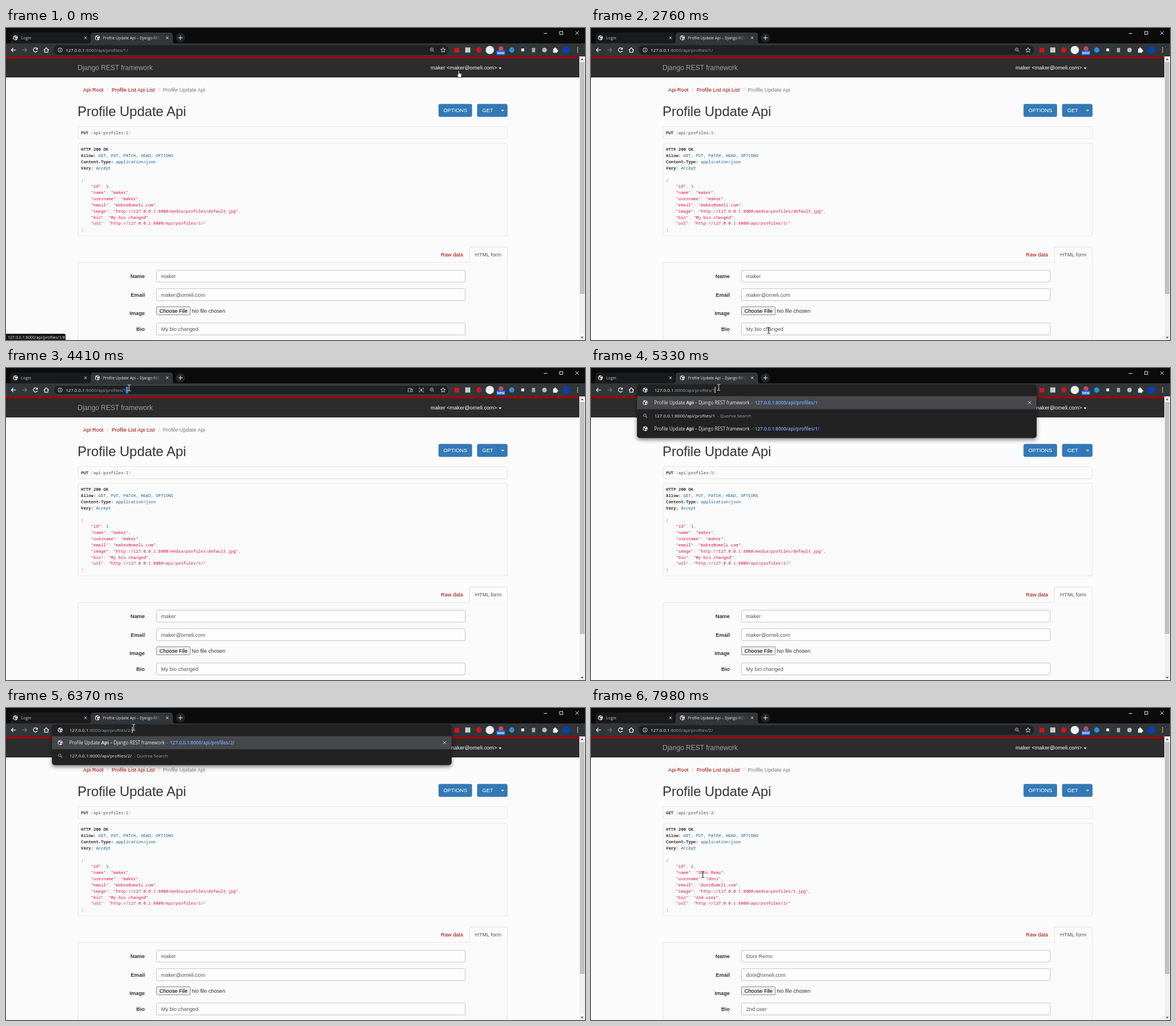
These frames come from a looping animation (1020 by 549 pixels, 8000 ms). An HTML page:

```html
<!DOCTYPE html>
<html lang="en">
<head>
<meta charset="utf-8">
<title>Profile Update Api</title>
<style>
html,body{margin:0;width:100%;height:100%;overflow:hidden;background:#fbfbfb}
svg{display:block;width:1020px;height:549px}
text{white-space:pre;font-family:"Liberation Sans",Arial,sans-serif}
.mono{font-family:"Noto Sans Mono",monospace}
.ui{font-family:"Open Sans","Noto Sans",sans-serif}
</style>
</head>
<body>
<svg id="stage" viewBox="0 0 1020 549" xmlns="http://www.w3.org/2000/svg">
  <defs>
    <linearGradient id="fade"><stop offset="0" stop-color="#323639" stop-opacity="0"/><stop offset="1" stop-color="#323639"/></linearGradient>
    <filter id="shadow" x="-5%" y="-15%" width="110%" height="140%"><feDropShadow dx="0" dy="3" stdDeviation="3.5" flood-color="#000" flood-opacity=".5"/></filter>
    <clipPath id="tabClip"><rect x="170" y="9" width="104" height="17"/></clipPath>
    <g id="globe"><circle r="4.3" fill="#e8eaed"/><path d="M-3.4-1.6L-.9-.8.2.6-.4 3.6-2 3ZM.2-3.6L2.3-3 1.2-1-.2-1.6ZM2 .6L3.7.2 2.8 2.2 1.4 2Z" fill="#202124"/></g>
  </defs>
  <g id="page"></g><g id="chrome"></g><g id="address"></g><g id="status"></g><g id="cursor"></g>
</svg>
<script>
const LOOP = 8000, HOST = '127.0.0.1', PATH = ':8000/api/profiles/';
const RED = '#a30000', STR = '#dd1144', LIT = '#195f91', PUN = '#93a1a1', GREY = '#9aa0a6', INK = '#e8eaed';
const $ = id => document.getElementById(id);
const esc = s => String(s).replace(/&/g, '&amp;').replace(/</g, '&lt;').replace(/>/g, '&gt;');
const text = (x, y, s, size, fill, attr = '') =>
  `<text x="${x}" y="${y}" font-size="${size}" fill="${fill}" ${attr}>${s}</text>`;
const span = (s, fill, attr = '') => `<tspan fill="${fill}" ${attr}>${esc(s)}</tspan>`;
const rect = (x, y, w, h, fill, attr = '') =>
  `<rect x="${x}" y="${y}" width="${w}" height="${h}" fill="${fill}" ${attr}/>`;
const dot = (x, y, r, fill, attr = '') => `<circle cx="${x}" cy="${y}" r="${r}" fill="${fill}" ${attr}/>`;
const line = (d, color = INK, w = 1.1) => `<path d="${d}" fill="none" stroke="${color}" stroke-width="${w}"/>`;
const shape = (d, fill) => `<path d="${d}" fill="${fill}"/>`;
const globe = (x, y) => `<use href="#globe" x="${x}" y="${y}"/>`;
const cross = (x, y, r, color = INK, w = 1) =>
  line(`M${x - r} ${y - r}l${2 * r} ${2 * r}m0 ${-2 * r}l${-2 * r} ${2 * r}`, color, w);
const arial = (x, y, s, fill, attr) => text(x, y, esc(s), 9.3, fill, attr);
const ui = (x, y, s, size, fill, attr = '') => text(x, y, s, size, fill, 'class="ui" ' + attr);

// Page
const users = [
  {verb: 'PUT', id: 1, name: 'maker', login: 'maker', image: 'default.jpg', bio: 'My bio changed'},
  {verb: 'GET', id: 2, name: 'Doni Remu', login: 'doni', image: '1.jpg', bio: '2nd user'}
];
const mail = u => u.login + '@omeli.com';

function code(y, s) { return text(132, y, s, 7.33, '#48484c', 'class="mono"'); }

function response(u) {
  const head = (k, v = '') => span(k, '#333', 'font-weight="700"') + span(v, LIT);
  const data = {id: u.id, name: u.name, username: u.login, email: mail(u),
    image: `http://${HOST}:8000/media/profiles/${u.image}`, bio: u.bio, url: `http://${HOST}${PATH}${u.id}/`};
  const keys = Object.keys(data);
  const rows = [head('HTTP 200 OK'), head('Allow:', ' GET, PUT, PATCH, HEAD, OPTIONS'),
    head('Content-Type:', ' application/json'), head('Vary:', ' Accept'), '', span('{', PUN),
    ...keys.map((k, i) => span(`    "${k}"`, STR) + span(': ', PUN) +
      span(JSON.stringify(data[k]), k === 'id' ? LIT : STR) + (i < keys.length - 1 ? span(',', PUN) : '')),
    span('}', PUN)];
  return rows.map((s, i) => code(216 + i * 10.87, s)).join('');
}

function request(u) {
  return code(186.6, span(u.verb, '#333', 'font-weight="700"') + span(' /', PUN) + 'api' + span('/', PUN) +
    'profiles' + span('/', PUN) + span(u.id, LIT) + span('/', PUN));
}

function field(label, y, value) {
  let s = arial(244.5, y + 3.5, label, '#333', 'font-weight="700" text-anchor="end"');
  if (value) s += rect(265, y - 10.5, 544, 21, '#fdfdfd', 'stroke="#c4c4c4" rx="2.4"') + arial(273.3, y + 3.3, value, '#555');
  return s;
}

function page(u, sel) {
  const box = (y, h) => rect(126.8, y, 756.4, h, '#fafafa', 'stroke="#e3e3e6" stroke-width=".8" rx="2.4"');
  const button = (x, w) => rect(x, 134, w, 22, '#337ab7', 'stroke="#2e6da4" stroke-width=".7" rx="2.4"');
  return rect(0, 50, 1020, 499, '#fbfbfb') +
    rect(0, 50, 1010, 37, '#2c2c2c') + rect(0, 50, 1010, 3.3, RED) +
    text(126, 74.2, 'Django REST framework', 12, '#9d9d9d') +
    arial(748, 73.2, `maker <${mail(users[0])}>`, '#fff') + shape('M867.8 69.4h5.4l-2.7 2.8Z', '#fff') +
    arial(136, 111.6, 'Api Root', RED) + arial(178, 111.6, '/', '#bbb') +
    arial(186, 111.6, 'Profile List Api List', RED) + arial(268, 111.6, '/', '#bbb') +
    arial(276.5, 111.6, 'Profile Update Api', '#777') +
    text(126, 155, 'Profile Update Api', 23.9, '#333') +
    button(762.3, 58.4) + arial(791.5, 148, 'OPTIONS', '#fff', 'text-anchor="middle"') +
    button(830.3, 52.8) + line('M867 134V156', '#2e6da4', .8) +
    arial(839, 148, 'GET', '#fff') + shape('M872.2 144h5.4l-2.7 2.8Z', '#fff') +
    box(173.5, 21.5) + request(u) + box(202.8, 163) +
    (sel ? rect(194, 284.2, sel, 11, '#3390ff') : '') + response(u) +
    (sel ? `<clipPath id="hit"><rect x="194" y="284" width="${sel}" height="12"/></clipPath>` +
      `<g clip-path="url(#hit)">${code(216 + 7 * 10.87, span(`    "name": "${u.name}",`, '#fff'))}</g>` : '') +
    box(412.3, 150) +
    `<path d="M816.4 412.7V388q0-2.6 2.6-2.6h61.6q2.6 0 2.6 2.6V412.7" fill="#fbfbfb" stroke="#ddd" stroke-width=".8"/>` +
    arial(766, 402, 'Raw data', RED) + arial(826.5, 402, 'HTML form', '#555') +
    field('Name', 436.6, u.name) + field('Email', 469.2, mail(u)) + field('Image', 501.8) + field('Bio', 529.5, u.bio) +
    rect(265.2, 490.5, 59.4, 14.2, '#efefef', 'stroke="#767676" stroke-width=".8" rx="1"') +
    arial(295, 500.8, 'Choose File', '#000', 'text-anchor="middle"') + arial(327.5, 500.8, 'No file chosen', '#333') +
    rect(1010, 50, 10, 499, '#f1f1f1') + rect(1011, 60, 8, 408, '#c1c1c1') +
    shape('M1012.5 56.5h5l-2.5-3Z', '#505050') + shape('M1012.5 543.5h5l-2.5 3Z', '#505050');
}

// Browser frame
function frame(loading) {
  const tabTitle = ui(170.7, 19.6, 'Profile Update Api – Django REST', 6.85, INK);
  return rect(0, 0, 1020, 28, '#0b0b0b') +
    shape('M5 27q3 0 3-3V13q0-5 5-5H143q5 0 5 5V27Z', '#191a1b') +
    shape('M145 27q4 0 4-4V13q0-5 5-5H289q5 0 5 5V23q0 4 4 4Z', '#323639') +
    rect(0, 27, 1020, 23, '#323639') +
    globe(16.7, 17.3) + ui(26.8, 19.7, 'Login', 7, '#c4c7cb') + cross(140, 17.3, 2.1) +
    globe(161, 17.3) + `<g clip-path="url(#tabClip)">${tabTitle}</g>` + rect(256, 9, 18, 17, 'url(#fade)') +
    cross(284, 17.3, 2.1) + dot(307.3, 17.3, 8.2, '#222426') + line('M303.5 17.3h7.6m-3.8-3.8v7.6', INK) +
    line('M947.5 9.5h6', '#fff', .9) + line('M975.5 6h5.4v5.4h-5.4Z', '#fff', .9) + cross(1006, 8.8, 2.8, '#fff', .9) +
    line('M17.5 38.7H9.5m3.6-3.7l-3.7 3.7 3.7 3.7', INK, 1.3) +
    line('M28.5 38.7h8m-3.6-3.7l3.7 3.7-3.7 3.7', '#75797d', 1.2) +
    (loading ? cross(52, 38.7, 3.3, INK, 1.3) :
      line('M55 36.4A3.7 3.7 0 1 0 55.4 40', INK, 1.3) + shape('M56 34v4h-4Z', INK)) +
    line('M66.6 39L71 34.8 75.4 39M68.2 38v4.6h5.6V38', INK, 1.3) +
    rect(790, 35, 8.5, 8, '#d8121c') + rect(809, 34.2, 9, 9, '#c9cac6') + dot(833, 38.7, 4.6, '#d9101b') +
    dot(852.3, 38.7, 7.3, '#f1f1f1') + dot(872, 36.5, 4.3, '#d2485a') +
    rect(864, 39.5, 15.4, 8, '#1769e0', 'rx="1.2"') + ui(871.7, 45.9, 'NEW', 5.6, '#fff', 'font-weight="700" text-anchor="middle"') +
    dot(891, 38.7, 4.6, '#2b8fe0') + rect(907.8, 36, 5, 5, '#eee') + rect(926.5, 35, 5.6, 7.6, '#a9a9a9') +
    dot(948.6, 38.7, 4, '#b9bcc0') +
    shape('M963.8 36.2h2.2a1.5 1.5 0 1 1 2.9 0h2v2.3a1.5 1.5 0 1 1 0 2.9v2h-7.1Z', '#f1f1f1') +
    dot(987.3, 38.7, 6.6, '#0b3fae') + [35.3, 38.7, 42.1].map(y => dot(1007, y, .95, INK)).join('');
}

// Address bar and suggestions
const full = tail => span(HOST, INK) + span(PATH + tail, GREY);
const endOf = (x, tail) => x + 102.2 + tail.length * 3.7 + (/\d/.test(tail) ? .6 : 0);
const caretLine = x => rect(x, 33, .9, 11, '#fff');

function bar({tail, focus, sel, caret}) {
  const end = endOf(105, tail);
  let s = rect(83.5, 30.2, 697, 17, '#202124', 'rx="8.5"' + (focus ? ' stroke="#4a4d51" stroke-width="1"' : '')) +
    dot(95.3, 38.7, 3.7, 'none', `stroke="${INK}" stroke-width=".9"`) + line('M95.3 38.2v2.6m0-4.4v1.1', INK, 1);
  if (sel) {
    const from = sel === 'all' ? 105 : end - 4;
    s += rect(from, 33, end - from, 12, '#2b7de9');
  }
  s += ui(105, 41.5, sel === 'all' ? span(HOST + PATH + tail, '#fff') : full(tail), 8, INK);
  if (caret) s += caretLine(end);
  if (focus) {
    s += line('M708.5 41V36h7M707.5 41.7h4M713 37.6h3v4h-3Z', GREY) +
      line('M728 37.2v-2h2m3.400 0h2v2m0 3v2h-2m-3.400 0h-2v-2', GREY) + rect(729.8, 37, 3.8, 3.8, GREY);
  }
  return s + dot(750, 37.9, 2.8, 'none', `stroke="${GREY}" stroke-width="1"`) +
    line('M752 40l2.500 2.500M748.600 37.900h2.800M750 36.500v2.800', GREY, .9) +
    `<path d="M770 34.500l1.200 2.800 3 .3-2.300 2 .7 3-2.600-1.600-2.600 1.600.7-3-2.300-2 3-.3Z" fill="none" stroke="${INK}" stroke-width=".9"/>`;
}

function suggestions({tail, rows, caret}) {
  const pitch = 22.9, blue = '#78a9ff';
  const bold = 'font-weight="600"';
  let s = rect(81, 29, 704, 25.6 + rows.length * pitch, '#202124', 'rx="5" filter="url(#shadow)"') +
    rect(81, 49.6, 704, pitch, '#46484b') + cross(772.5, 61, 2.6, INK) +
    globe(95.5, 38.7) + ui(111.7, 41.5, full(tail), 8, INK) + (caret ? caretLine(endOf(111.7, tail)) : '');
  rows.forEach((row, i) => {
    const y = 61 + i * pitch, b = y + 2.8;
    if (row === 'search') {
      s += dot(94.7, y - .7, 2.4, 'none', `stroke="${GREY}" stroke-width="1"`) + line(`M96.500 ${y + 1.100}l2.600 2.600`, GREY) +
        ui(111.7, b, span(HOST + PATH + tail, INK) + span('  - Quorva Search', GREY), 8, INK);
    } else {
      s += globe(95.5, y);
      const url = span(HOST + PATH + tail, blue, bold) + span(row.slice(tail.length), blue);
      if (!row) s += ui(111.7, b, url, 8.1, blue);
      else s += ui(111.5, b, `Profile Update <tspan font-weight="700">Api</tspan> – Django REST framework`, 8.1, INK) +
        ui(282.3, b, '-', 8.1, GREY) + ui(288.7, b, url, 8.1, blue);
    }
  });
  return s;
}

const barSteps = [
  [0, {tail: '1/'}],
  [3760, {tail: '1/', focus: 1, sel: 'all'}],
  [4150, {tail: '1/', focus: 1, caret: 1}],
  [4410, {tail: '1/', focus: 1, sel: 'last'}],
  [4680, {tail: '1/', focus: 1, caret: 1}],
  [5210, {tail: '1', rows: ['1', 'search', '1/'], caret: 1}],
  [5450, {tail: '', rows: ['', 'search', '1', '2', '1/', '2/'], caret: 1}],
  [5720, {tail: '2', rows: ['2', 'search', '2/'], caret: 1}],
  [6120, {tail: '2', rows: ['2', 'search', '2/']}],
  [6370, {tail: '2/', rows: ['2/', 'search'], caret: 1}],
  [6870, {tail: '2/'}]
];
// user index, selected width, loading
const pageSteps = [[0, 0, 0, 0], [1550, 0, 18, 0], [1670, 0, 26.4, 0], [1940, 0, 0, 0], [6870, 0, 0, 1], [6990, 1, 0, 0]];
const statusSteps = [[0, 1], [860, .6], [1010, .25], [1140, 0]];
// H hand, A arrow, I text beam
const cursorSteps = [
  [0, 'H', 797.5, 75], [140, 'A', 680, 99], [260, 'A', 600, 140], [380, 'A', 510, 195], [500, 'A', 426, 238],
  [620, 'A', 345, 272], [740, 'A', 285, 296], [860, 'A', 252, 302], [1010, 'A', 222, 296], [1140, 'I', 197, 293],
  [1280, 'I', 195, 291], [1430, 'I', 196, 290], [1550, 'I', 212, 290], [1670, 'A', 234, 289], [1790, 'A', 250, 290],
  [1940, 'A', 266, 298], [2060, 'A', 285, 309], [2370, 'A', 262, 281], [2520, 'A', 348, 410], [2640, 'I', 336, 526],
  [2760, 'I', 313, 532], [2880, 'A', 300, 420], [3000, 'A', 275, 270], [3130, 'A', 253, 120], [3250, 'I', 238, 40],
  [3370, 'I', 245, 40], [3490, 'I', 238, 40], [3610, 'I', 230, 40], [3910, 'I', 227, 39], [4030, 'I', 222, 38],
  [4150, 'I', 216, 38], [4410, 'I', 217, 35], [4530, 'I', 215, 36], [4680, 'I', 219, 38], [4800, 'I', 223, 36],
  [4940, 'I', 225, 34], [7360, 'A', 238, 110], [7480, 'A', 264, 215], [7600, 'A', 274, 318],
  [7740, 'A', 244, 317], [7860, 'I', 208, 298], [7980, 'I', 197, 293]
];
const edge = 'fill="#fff" stroke="#000" stroke-width=".8" stroke-linejoin="round"';
const cursors = {
  H: () => `<path d="M-1 1q0-1.200 1-1.200t1 1.200V4.500q3.800.2 4.400 1.500.2 3.500-1.200 6H-.8Q-1.800 9-3.600 7.200-3.400 5.800-1 7.600Z" ${edge}/>`,
  A: () => `<path d="M0 0V10.200L2.300 8.200 3.800 11.600 5.300 11 3.800 7.700H7Z" ${edge}/>`,
  I: y => line('M-2.600-5.200h1.800l.8.6.8-.6h1.800M0-4.600V4.600M-2.600 5.200h1.800l.8-.6.8.6h1.800', y < 50 ? '#e4e4e4' : '#111', 1)
};

const at = (steps, t) => steps.findLast(s => s[0] <= t);
const last = {};
function show(id, step, draw) {
  if (last[id] === step) return;
  last[id] = step;
  $(id).innerHTML = draw(step);
}

function render(t) {
  const p = at(pageSteps, t);
  show('page', p, ([, user, sel]) => page(users[user], sel));
  show('chrome', p, s => frame(s[3]));
  show('address', at(barSteps, t), ([, s]) => s.rows ? suggestions(s) : bar(s));
  show('status', at(statusSteps, t), ([, alpha]) => alpha ? `<g opacity="${alpha}">` +
    shape('M0 538H102q3 0 3 3V549H0Z', '#17181a') + ui(3, 547, `${HOST}${PATH}1/#`, 7.05, INK) + '</g>' : '');
  show('cursor', at(cursorSteps, t), ([, kind, x, y]) => `<g transform="translate(${x} ${y})">${cursors[kind](y)}</g>`);
}

const start = performance.now();
function tick() {
  render((performance.now() - start) % LOOP);
  requestAnimationFrame(tick);
}
tick();
</script>
</body>
</html>
```
